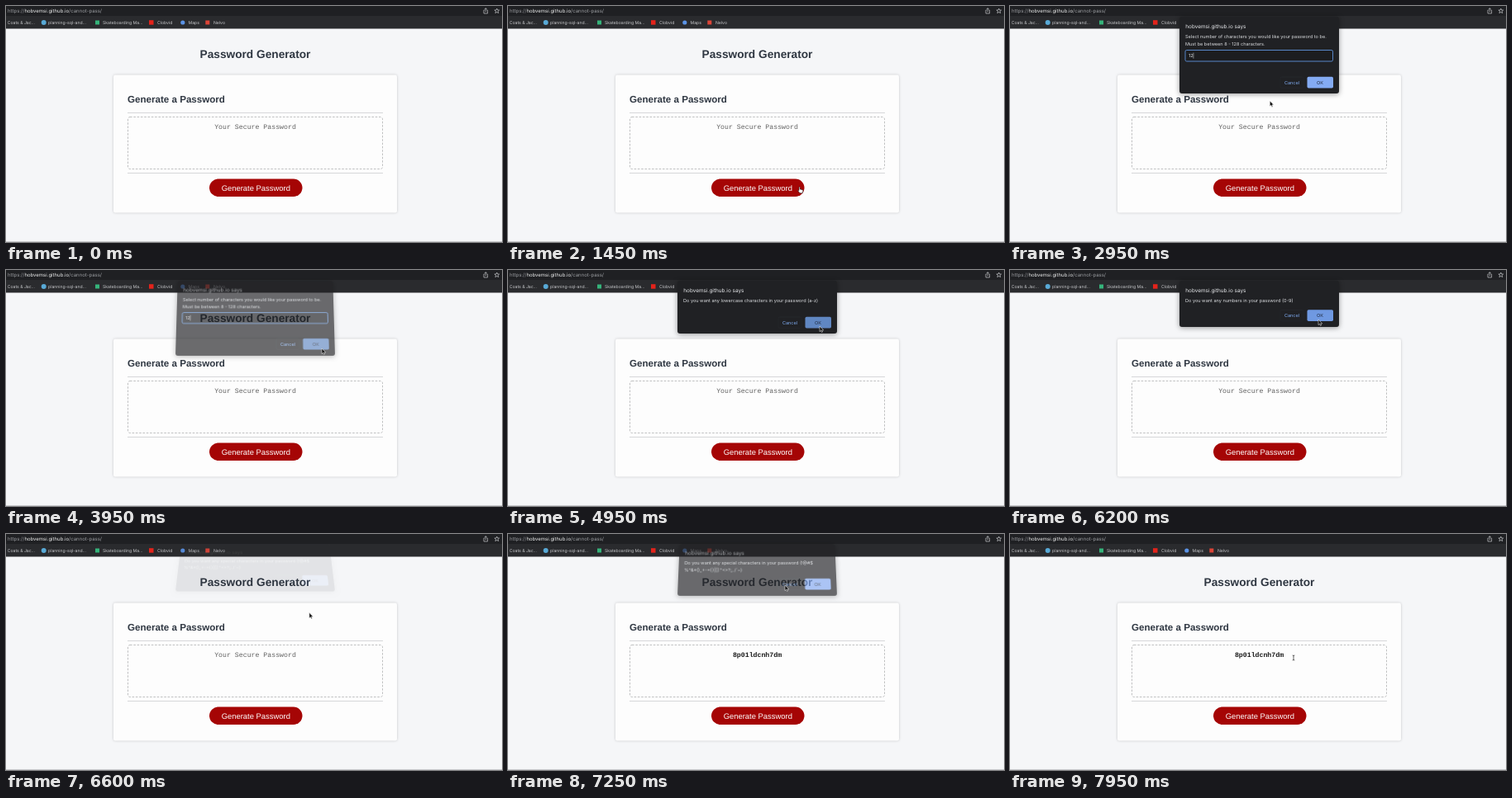
Recreate the animation shown at these times as an HTML page. Size 600 px wide and 286 px high, loop 8000 ms.

```html
<!DOCTYPE html>
<html lang="en">
<head>
<meta charset="utf-8">
<title>Password Generator</title>
<style>
  html, body { margin: 0; width: 100%; height: 100%; overflow: hidden; background: #f5f6f8; }
  svg { position: absolute; left: 0; top: 0; overflow: visible; text-rendering: geometricPrecision; }
  text { font-family: Inter, Roboto, sans-serif; white-space: pre; }
  .page text { font-family: "Liberation Sans", Arial, sans-serif; }
  .page .mono { font-family: "Liberation Mono", "Courier New", monospace; font-size: 8.23px; }
  .url { font-size: 6px; }
  .marks { font-size: 5.14px; fill: #c6c7ca; }
  .mid { text-anchor: middle; }
  #dialog { left: 205px; top: 12.5px; border-radius: 3px; background: #202124;
    box-shadow: 0 1px 6px rgba(0, 0, 0, .4); transform-origin: 50% 100%; }
  #dialog text { font-size: 5.57px; fill: #d9dbde; }
  #dialog .title { font-size: 6.43px; fill: #e8eaed; }
</style>
</head>
<body>
<svg width="600" height="286">
  <rect width="600" height="27.5" fill="#2a2b2e"/>
  <rect width="600" height="12" fill="#1f2023"/>
  <text class="url" x="2" y="8.2" fill="#9a9ca0">https://<tspan fill="#eceded">hobvemsi.github.io</tspan>/cannot-pass/</text>
  <g fill="none" stroke="#c6c7ca" stroke-width=".7">
    <path d="M579 5h-1v4h4.600v-4h-1M580.300 7.200v-4.400M578.900 4l1.400-1.400l1.400 1.400"/>
    <path d="M593.800 3l.8 2h2.100l-1.600 1.400l.6 2.200l-1.900-1.200l-1.900 1.200l.6-2.200l-1.600-1.400h2.100z"/>
  </g>
  <g class="marks">
    <text x="-2.500" y="21.900">s Coats &amp; Jac...</text>
    <text x="51" y="21.900">planning-sql-and...</text>
    <text x="117" y="21.900">Skateboarding Ma...</text>
    <text x="183" y="21.900">Clobvid</text>
    <text x="220.500" y="21.900">Maps</text>
    <text x="251" y="21.900">Nelvo</text>
  </g>
  <circle cx="45.700" cy="20" r="3" fill="#58a9d6"/>
  <rect x="108" y="17.500" width="5" height="5" fill="#35b37a"/>
  <rect x="173" y="17.200" width="5.500" height="5.500" fill="#e3231b"/>
  <circle cx="213.800" cy="20" r="2.600" fill="#5b93e6"/>
  <rect x="241.300" y="17.500" width="5" height="5" fill="#dc4437"/>

  <g class="page">
    <text class="mid" x="301.500" y="62.600" font-size="13.700" font-weight="700" fill="#2f3742">Password Generator</text>
    <rect x="130" y="83.500" width="343" height="167" rx="2.200" fill="#fdfdfd" style="filter:drop-shadow(0 .9px 1.800px rgba(0,0,0,.2))"/>
    <text x="147" y="116.700" font-size="11.600" font-weight="700" fill="#2f3742">Generate a Password</text>
    <path d="M147 129.500h309M147 202.500h309" stroke="#d2d3d5" stroke-width=".9"/>
    <rect x="147.500" y="134.500" width="308" height="63" rx="2.500" fill="none" stroke="#b9babb" stroke-width=".9" stroke-dasharray="2.600 1.700"/>
    <text id="field" class="mid mono" x="301.500" y="149"></text>
    <rect x="246" y="209.500" width="112.500" height="21.500" rx="10.750" fill="#a50505"/>
    <text class="mid" x="302.300" y="223.500" font-size="9.430" fill="#fff">Generate Password</text>
  </g>
  <rect y="285" width="600" height="1" fill="#c9cacd"/>
</svg>

<svg id="dialog" width="193" height="93.500">
  <text class="title" x="7.300" y="13.700">hobvemsi.github.io says</text>
  <text id="line0" x="7" y="26.300"></text>
  <text id="line1" x="7" y="34.800"></text>
  <g id="prompt">
    <rect x="7" y="40.500" width="178.500" height="13.500" rx="1.700" fill="#1c1d20" stroke="#5f94dd" stroke-width=".9"/>
    <text id="typed" x="11" y="49.200"></text>
    <path id="caret" d="M0 43.700v7" stroke="#e8eaed" stroke-width=".5"/>
  </g>
  <g id="buttons">
    <rect x="122" y=".2" width="28" height="13.300" rx="1.700" fill="none" stroke="#2c2e33" stroke-width=".4"/>
    <text class="mid" x="136" y="8.800" style="fill:#7da8ec">Cancel</text>
    <rect id="ok" x="154.500" width="31.500" height="13.700" rx="1.700"/>
    <text class="mid" x="170" y="8.800" style="fill:#26324a">OK</text>
  </g>
</svg>

<svg id="cursor" width="10" height="12">
  <path id="arrow" d="M0 0v6.600l1.500-1.300l1 2.200l1.100-.5l-1-2.100h2.100z" fill="#111" stroke="#fff" stroke-width=".5"/>
  <path id="hand" d="M0 .6q.6-.9 1.200 0v2.400l3 .7q.9.300.7 1.300l-.6 2.800h-3.300l-2.500-3.200q.2-.9 1.500.1z" fill="#fff" stroke="#111" stroke-width=".5"/>
  <path id="beam" d="M-1.300-3q1.300 0 1.300.8q0-.8 1.300-.8M0-2.500v5M-1.300 3q1.300 0 1.300-.8q0 .8 1.300.8" fill="none" stroke="#222" stroke-width=".7"/>
</svg>

<script>
const LOOP = 8000, OPENING = 100, CLOSING = 140;
const $ = id => document.getElementById(id);
const ask = what => `Do you want any ${what}`;

const dialogs = [
  { open: 1570, close: 3900, h: 93.5, prompt: true, lines: [
    'Select number of characters you would like your password to be.',
    'Must be between 8 - 128 characters.'] },
  { open: 4110, close: 5000, h: 64.5, lines: [ask('lowercase characters in your password (a-z)')] },
  { open: 5200, close: 5850, h: 64.5, lines: [ask('uppercase characters in your password (A-Z)')] },
  { open: 6040, close: 6400, h: 56, lines: [ask('numbers in your password (0-9)')] },
  { open: 6600, close: 7200, h: 64.5, lines: [
    ask('special characters in your password (!@#$'), '%^&*()_+-={}|[]:"<>?;,./`~)'] }
];

// time, x, y of the pointer
const path = [
  [150, 356, 255], [550, 342, 240], [950, 338, 222], [1450, 352, 219],
  [1780, 352, 219], [1900, 364, 175], [2050, 314, 115], [2930, 314, 115],
  [3450, 384, 101], [3750, 382, 95], [4380, 382, 95], [4900, 377, 68],
  [5300, 377, 68], [5750, 341, 64], [5900, 341, 64], [6170, 373, 60],
  [6420, 373, 60], [6650, 366, 100], [7000, 335, 62], [7280, 335, 62],
  [7900, 343, 150], [LOOP, 343, 150]
];

const clamp = v => Math.max(0, Math.min(1, v));
const inside = (x, y, l, t, r, b) => x > l && x < r && y > t && y < b;
const show = (el, on) => el.style.display = on ? '' : 'none';

function pointerAt(t) {
  const i = path.findIndex(p => p[0] > t);
  if (i < 1) return null;
  const [t0, x0, y0] = path[i - 1], [t1, x1, y1] = path[i];
  const k = clamp((t - t0) / (t1 - t0)), e = k * k * (3 - 2 * k);
  return [x0 + (x1 - x0) * e, y0 + (y1 - y0) * e];
}

function drawDialog(d, t, x, y) {
  show($('dialog'), d);
  if (!d) return;
  // away: 0 when fully open, 1 when gone
  const away = Math.max(1 - clamp((t - d.open) / OPENING), clamp((t - d.close) / CLOSING));
  const el = $('dialog'), top = d.h - 20.7;
  el.setAttribute('height', d.h);
  el.style.opacity = 1 - away * .92;
  el.style.transform = away
    ? `perspective(${4 * d.h}px) translateY(${-8.5 * away}px) rotateX(${18 * away}deg)` : 'none';
  [0, 1].forEach(i => $('line' + i).textContent = d.lines[i] || '');

  show($('prompt'), d.prompt);
  const typed = t < 2550 ? '' : t < 2750 ? '1' : '12';
  $('typed').textContent = typed;
  $('caret').setAttribute('transform', `translate(${[11.3, 13.6, 16.9][typed.length]} 0)`);

  $('buttons').setAttribute('transform', `translate(0 ${top})`);
  const over = inside(x - 205, y - 12.5, 154.5, top, 186, top + 13.7);
  const pressed = over && t > d.close - 100;
  $('ok').setAttribute('fill', pressed ? '#6087c2' : over ? '#6f99e2' : '#84abf3');
}

function drawPage(t) {
  const done = t >= 7200, field = $('field');
  field.textContent = done ? '8p01ldcnh7dm' : 'Your Secure Password';
  field.setAttribute('fill', done ? '#1c1c1c' : '#626262');
  field.setAttribute('font-weight', done ? 700 : 400);
}

function drawCursor(pos, modal) {
  show($('cursor'), pos);
  if (!pos) return;
  const [x, y] = pos;
  const kind = modal ? 'arrow'
    : inside(x, y, 147, 134, 456, 198) ? 'beam'
    : inside(x, y, 246, 209, 359, 231) ? 'hand' : 'arrow';
  ['arrow', 'hand', 'beam'].forEach(id => show($(id), id === kind));
  $('cursor').style.transform = `translate(${x}px, ${y}px)`;
}

function frame() {
  const t = performance.now() % LOOP;
  const pos = pointerAt(t), d = dialogs.find(d => t >= d.open && t < d.close + CLOSING);
  drawPage(t);
  drawDialog(d, t, ...(pos || [0, 0]));
  drawCursor(pos, t >= dialogs[0].open && t < 7340 && !(pos && pos[1] > 130 && t < 2050));
  requestAnimationFrame(frame);
}
frame();
</script>
</body>
</html>
```
